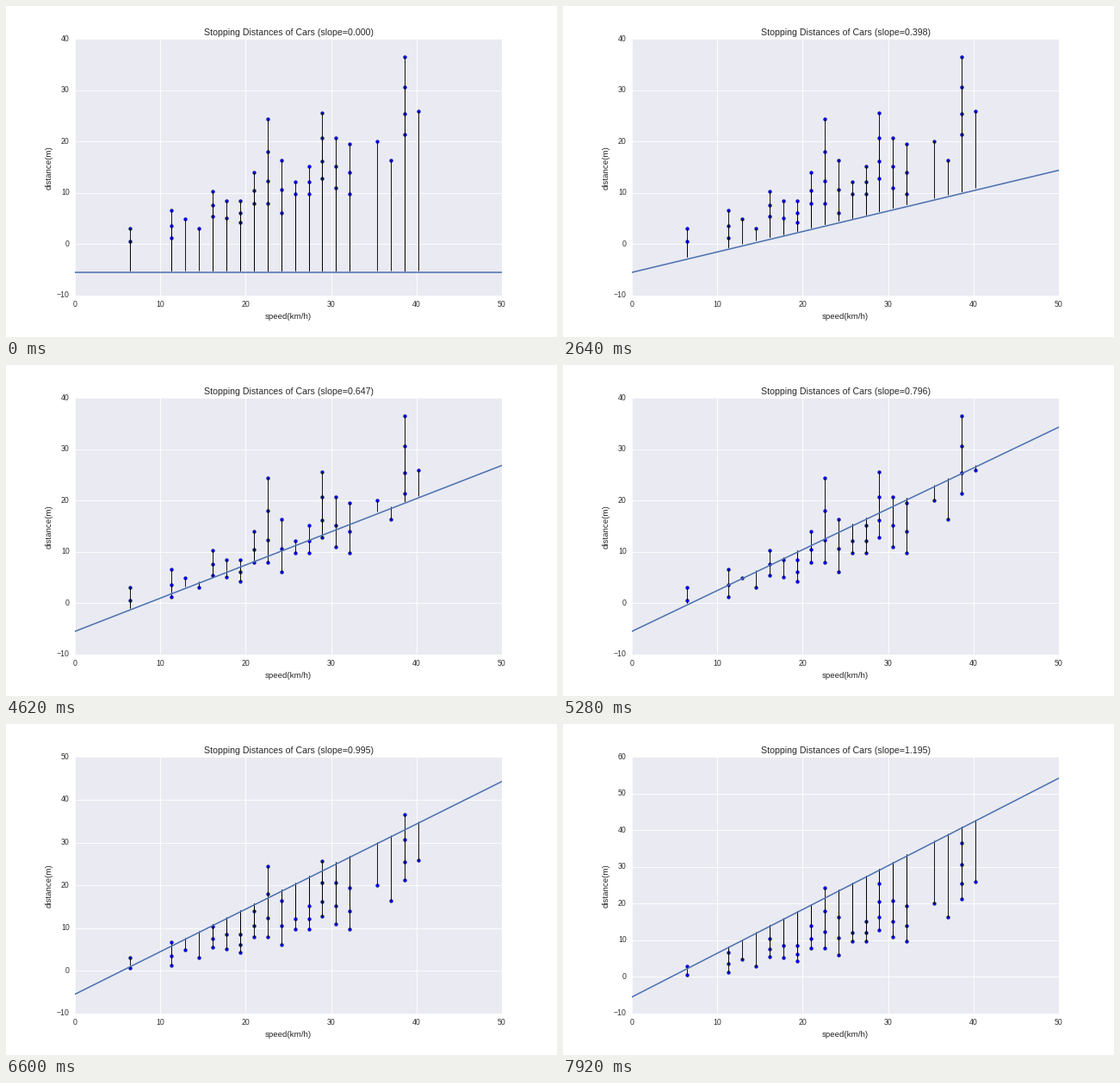
A matplotlib script for the animation above (8 s loop, 640 by 384 pixels).

```python
import numpy as np
import matplotlib.pyplot as plt
from matplotlib.animation import FuncAnimation

plt.rcParams.update({
    "font.family": "Liberation Sans",
    "text.hinting": "native",
    "text.color": "0.15",
    "axes.labelcolor": "0.15",
    "xtick.color": "0.15",
    "ytick.color": "0.15",
})

LOOP, TICK, HOLD = 8000, 40, 330   # ms
SLOPE_STEP = 0.049772
LINE_BASE = -5.47
RESIDUAL_BASE = -5.06
KMH, METRE = 1.61, 0.3048          # per mph, per foot

# shortest and longest stop in feet, for each speed in mph
MPH = [4, *range(7, 21), *range(22, 26)]
SPANS = [(2, 10), (4, 22), (16, 16), (10, 10), (18, 34), (17, 28), (14, 28),
         (26, 46), (26, 80), (20, 54), (32, 40), (32, 50), (42, 84), (36, 68),
         (32, 64), (66, 66), (54, 54), (70, 120), (85, 85)]


def stops(low, high):
    """Spread stops over a span: more for wide ones, denser near the bottom."""
    if low == high:
        return np.array([low])
    t = np.linspace(0, 1, 2 + round((high - low) / 24))
    return low + (high - low) * t ** 1.2


points = np.array([(v * KMH, d * METRE)
                   for v, span in zip(MPH, SPANS) for d in stops(*span)])
speed, dist = points.T

fig = plt.figure(figsize=(10, 6), dpi=64, facecolor="white")
ax = fig.add_axes([0.125, 0.125, 0.775, 0.775], facecolor="#EAEAF2")
ax.spines[:].set_visible(False)
ax.set_axisbelow(True)
ax.grid(color="white", lw=1, ls="-")
ax.tick_params(length=0, pad=7, labelsize=10)
ax.set_xlabel("speed(km/h)", fontsize=11, labelpad=5)
ax.set_ylabel("distance(m)", fontsize=11, labelpad=5)
title = ax.set_title("", fontsize=12, pad=5)
ax.set_xlim(0, 50)
ax.set_xticks(range(0, 51, 10))

ax.scatter(speed, dist, s=20, c="#0000ff", edgecolors="black",
           linewidths=0.3, zorder=1)
residuals = ax.vlines(speed, dist, dist, color="black", lw=1, zorder=1)
fit, = ax.plot([], [], color="#4C72B0", lw=1.75, zorder=2)


def update(i):
    slope = i * TICK // HOLD * SLOPE_STEP
    ends = np.array([0, 51])
    line = LINE_BASE + slope * ends
    fit.set_data(ends, line)
    base = RESIDUAL_BASE + slope * speed
    residuals.set_segments([[(x, y), (x, b)]
                            for x, y, b in zip(speed, dist, base)])
    # the axis grows by whole tens once the line passes its top
    top = max(40, 10 * int(np.ceil(line[1] / 10)))
    ax.set_ylim(-10, top)
    ax.set_yticks(range(-10, top + 1, 10))
    for label in ax.get_yticklabels():
        label.set_va("center")
    title.set_text(f"Stopping Distances of Cars (slope={slope:.3f})")
    return fit, residuals, title


anim = FuncAnimation(fig, update, frames=LOOP // TICK, interval=TICK,
                     repeat=True, repeat_delay=0, blit=False)
plt.show()
```
